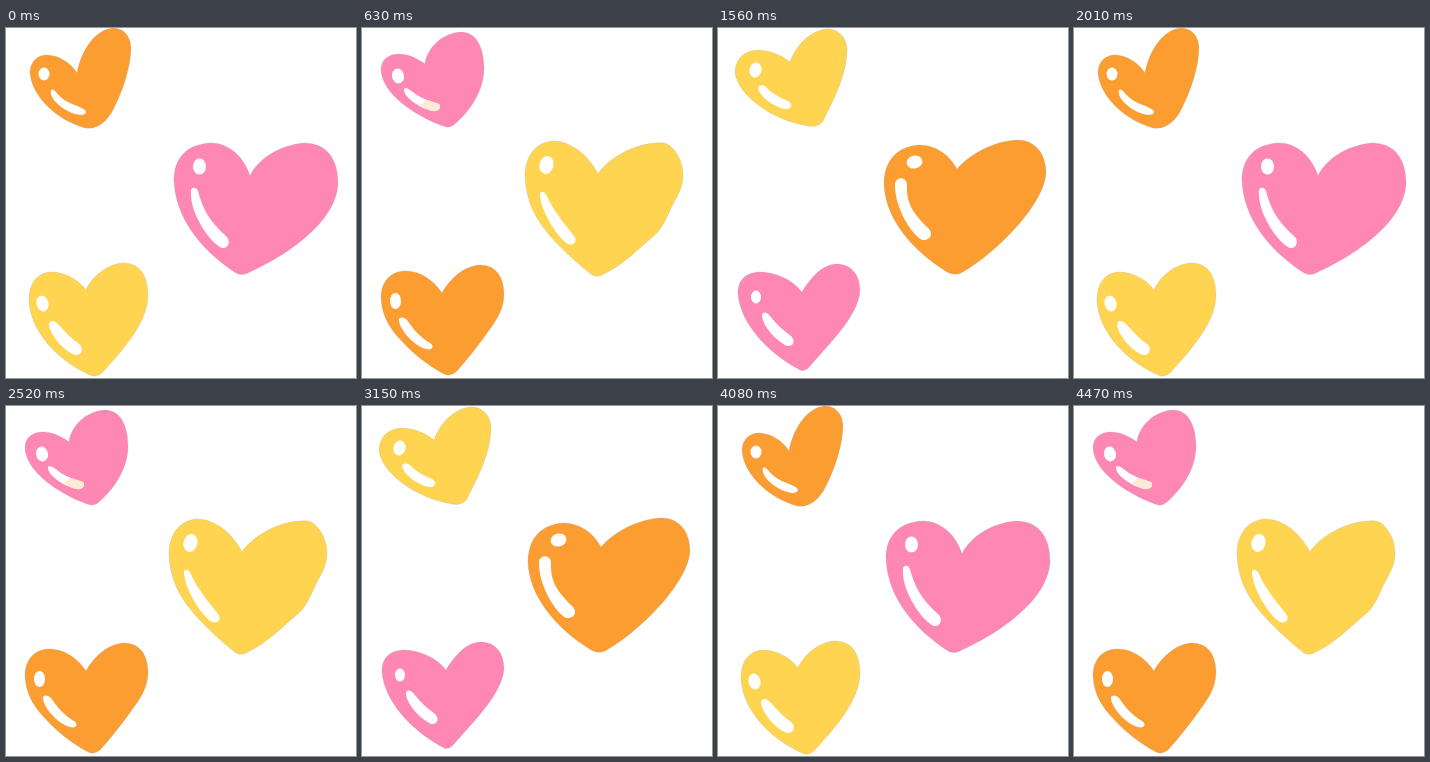
Recreate the animation shown at these times as an HTML page. Size 350 px wide and 350 px high, loop 4.5 s.

```html
<!DOCTYPE html>
<html lang="en">
<head>
<meta charset="utf-8">
<title>Hearts</title>
<style>
  html, body { margin: 0; width: 100%; height: 100%; overflow: hidden; background: #fff; }
  svg { display: block; width: 100vw; height: 100vh; }
  .heart { stroke: #999; stroke-opacity: .35; stroke-width: .6; }
  .orange { fill: #fc9d31; }
  .pink { fill: #ff87b4; }
  .yellow { fill: #ffd451; }
  .shine { fill: #fff; }
  .tint { fill: #fdebd3; }
</style>
</head>
<body>
<svg viewBox="0 0 350 350">
  <g class="pose">
    <path class="heart orange" d="M71 45C66 36 53 27 41 27C30 27 24 35 24 45C26 69 51 92 79 100C92 102 101 93 107 82C117 63 125 38 125 19C124 6 116 0 107 0C90 1 75 22 71 45Z"/>
    <ellipse class="shine" cx="38" cy="46" rx="5.5" ry="6.5"/>
    <path class="shine" d="M45 62C48 59 52 69 62 74C70 78 79 80 80 84C79 89 68 87 60 82C51 77 43 68 45 62Z"/>

    <path class="heart pink" d="M244 148C238 128 222 115 205 115C181 116 168 130 168 152C169 188 193 221 230 245Q236 248 242 245C280 228 331 194 332 155C332 129 319 115 298 115C273 117 251 132 244 148Z"/>
    <ellipse class="shine" cx="193.5" cy="138.5" rx="6.5" ry="8"/>
    <path class="shine" d="M185 165C184 159 190 158 192 163C198 186 207 196 221 209C225 214 222 221 216 220C205 216 184 186 185 165Z"/>

    <path class="heart yellow" d="M80 262C72 251 58 244 45 244C30 245 23 256 23 273C24 300 48 331 84 347Q90 350 96 345C116 323 141 296 142 268C142 246 133 235 117 235C100 236 85 250 80 262Z"/>
    <ellipse class="shine" cx="36.5" cy="275.5" rx="6" ry="8" transform="rotate(-15 36.5 275.5)"/>
    <path class="shine" d="M43 297C43 292 48 292 52 296C59 304 66 311 73 316C78 320 76 327 70 327C60 325 45 309 43 297Z"/>
  </g>

  <g class="pose">
    <path class="heart yellow" d="M72 34C62 26 50 22 39 22C25 23 17 32 17 45C21 70 58 93 90 98Q100 100 105 93C113 76 129 49 129 21C128 8 120 1 109 1C93 2 78 17 72 34Z"/>
    <ellipse class="shine" cx="37.5" cy="42" rx="6" ry="7.5" transform="rotate(15 37.5 42)"/>
    <path class="shine" d="M40 60C41 56 46 57 49 60C56 67 63 70 70 73C75 76 74 81 68 81C57 80 41 68 40 60Z"/>

    <path class="heart orange" d="M239 141C231 126 217 117 202 117C179 118 166 133 166 156C167 189 192 221 229 244Q236 248 243 245C273 229 326 179 328 145C328 125 317 112 299 112C276 113 252 126 239 141Z"/>
    <ellipse class="shine" cx="196.5" cy="134" rx="8" ry="6.5" transform="rotate(-12 196.5 134)"/>
    <path class="shine" d="M177 157C177 148 189 148 189 157C188 177 197 187 211 201C216 207 211 213 204 212C192 205 177 179 177 157Z"/>

    <path class="heart pink" d="M84 264C74 251 57 244 41 244C26 245 20 253 20 266C22 294 48 324 82 342Q87 344 92 338C112 315 140 288 142 263C142 246 133 236 118 236C103 237 92 251 84 264Z"/>
    <ellipse class="shine" cx="38" cy="269" rx="5" ry="6.5"/>
    <path class="shine" d="M44 287C45 283 49 284 52 288C59 297 66 303 73 308C78 313 75 319 69 318C57 312 44 297 44 287Z"/>
  </g>

  <g class="pose">
    <path class="heart pink" d="M63 36C55 30 46 26 37 26C26 26 19 32 19 42C20 65 51 87 81 98Q88 101 93 96C109 82 122 62 122 40C122 19 114 4 99 4C80 5 65 20 63 36Z"/>
    <ellipse class="shine" cx="36" cy="48" rx="6" ry="7.5" transform="rotate(-12 36 48)"/>
    <path class="shine" d="M42 61C44 58 49 63 55 67C63 72 71 74 77 76C80 80 76 84 70 83C58 80 41 69 42 61Z"/>
    <path class="tint" d="M64 72C68 73 73 74 77 76C80 80 76 84 70 83Q64 81 58 77Z"/>

    <path class="heart yellow" d="M236 146C226 126 208 113 191 113C174 114 163 128 163 148C164 175 175 193 190 210C203 224 217 237 230 247Q236 250 242 246C261 237 275 222 294 206C301 199 305 189 309 180C315 168 321 160 321 148C321 138 318 131 315 126C311 120 307 116 302 115C276 113 246 130 236 146Z"/>
    <ellipse class="shine" cx="184.5" cy="137" rx="7" ry="9" transform="rotate(15 184.5 137)"/>
    <path class="shine" d="M178 168C177 163 182 162 185 168C191 182 201 194 212 208C216 213 212 218 206 216C195 209 180 185 178 168Z"/>

    <path class="heart orange" d="M80 265C71 251 56 242 42 243C27 244 19 255 19 270C20 287 26 297 35 308C49 324 65 337 82 346Q88 349 94 344C104 333 114 320 123 308C133 294 142 283 142 266C142 248 133 237 118 237C101 238 87 252 80 265Z"/>
    <ellipse class="shine" cx="33.5" cy="273" rx="5.5" ry="8"/>
    <path class="shine" d="M37 293C36 289 41 288 45 292C51 301 58 309 68 315C73 318 70 323 64 321C53 318 39 304 37 293Z"/>
  </g>
</svg>
<script>
  const LOOP = 4500, HOLD = 315, LEAD = 6;
  const poses = [...document.querySelectorAll('.pose')];

  function draw(time) {
    const current = Math.floor((time % LOOP + LEAD) / HOLD) % poses.length;
    poses.forEach((pose, i) => pose.style.display = i === current ? '' : 'none');
  }

  const start = performance.now();
  function tick() {
    draw(performance.now() - start);
    requestAnimationFrame(tick);
  }
  tick();
</script>
</body>
</html>
```
